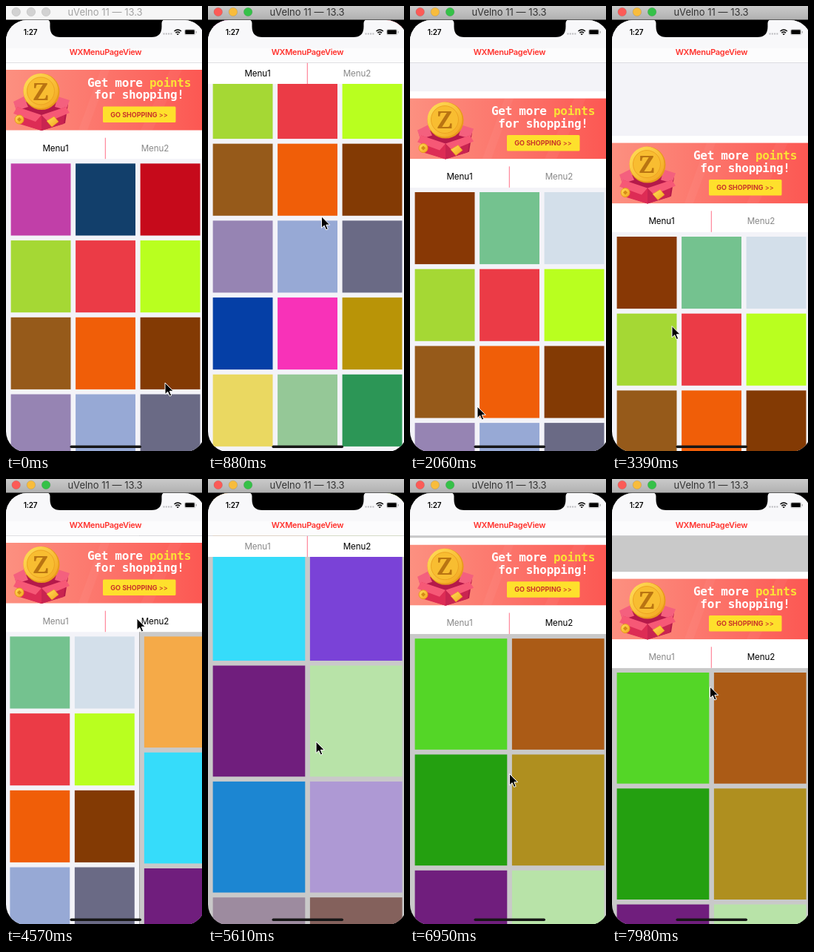
These frames come from a looping animation (265 px wide and 600 px high, 8 s). An HTML page:

```html
<!DOCTYPE html>
<html lang="en">
<head>
<meta charset="utf-8">
<title>Menu page view</title>
<style>
  html, body { margin: 0; width: 100%; height: 100%; overflow: hidden; background: #000; }
  svg { display: block; width: 265px; height: 600px; }
  text { font-family: Inter, Roboto, sans-serif; text-anchor: middle; }
  .window-title { font-size: 13px; }
  .nav-title { font-size: 11px; font-weight: 600; letter-spacing: -.3px; fill: #ff322d; }
  .clock { font-size: 10px; font-weight: 600; letter-spacing: -.2px; }
  .tab { font-size: 11.6px; letter-spacing: -.1px; }
  .slogan { font: bold 16px "DejaVu Sans Mono", monospace; letter-spacing: -.3px; fill: #fff; }
  .cta { font-size: 9px; font-weight: 700; fill: #c9342a; }
</style>
</head>
<body>
<svg viewBox="0 0 265 600">
  <defs>
    <clipPath id="screen"><rect y="19" width="269" height="582.5" rx="28"/></clipPath>
    <linearGradient id="barFill" x2="0" y2="1">
      <stop stop-color="#cacaca"/><stop offset="1" stop-color="#b0b0b0"/>
    </linearGradient>
    <linearGradient id="coral">
      <stop stop-color="#fc9080"/><stop offset=".45" stop-color="#fc776d"/><stop offset="1" stop-color="#fc5752"/>
    </linearGradient>
    <linearGradient id="gold" x2="1" y2="1">
      <stop stop-color="#ffe05a"/><stop offset="1" stop-color="#f3a41e"/>
    </linearGradient>
  </defs>

  <rect width="265" height="600"/>
  <rect id="bar" width="265" height="18.5"/>
  <g id="lights"></g>
  <text id="windowTitle" class="window-title" x="134" y="13">uVelno 11 — 13.3</text>

  <g clip-path="url(#screen)">
    <g id="pages">
      <rect y="19" width="269" height="582" fill="#f3f3f8"/>
      <rect x="269" y="19" width="269" height="582" fill="#c9c9c9"/>
      <g id="grids"></g>
    </g>

    <g id="header">
      <rect y="76.5" width="269" height="129.5" fill="#fff"/>
      <g transform="translate(0 86)">
        <rect width="269" height="81.5" fill="url(#coral)"/>
        <path d="M128 0h12l-30 81.500H98zM222 0h16l-40 81.500h-16z" fill="#fff" opacity=".04"/>
        <path d="M12 47 46 39 84 46 80 72 48 82 18 72z" fill="#b5194a"/>
        <path d="M10 43 24 36 30 50 14 55zM86 41 70 36 66 50 81 54z" fill="#f4607e"/>
        <circle cx="48" cy="29.500" r="24.500" fill="#e89a1c"/>
        <circle cx="47" cy="28.500" r="23.500" fill="url(#gold)"/>
        <circle cx="47" cy="28.500" r="18.500" fill="#f8bd31" stroke="#eda322"/>
        <text x="47" y="40.500" style="font: bold 33px 'Noto Serif', serif" fill="#b97412">Z</text>
        <path d="M15 50 48 62V82L18 73z" fill="#dd2c55"/>
        <path d="M81 50 48 62V82L78 73z" fill="#c92450"/>
        <path d="M15 50 48 61 40 70 10 59zM81 50 48 61 57 70 86 58z" fill="#f65876"/>
        <circle cx="18" cy="67" r="6" fill="url(#gold)" stroke="#e89a1c"/>
        <path d="m15 67 3-3 3 3-3 3z" fill="#d48a18"/>
        <path d="m55 69 10-6 6 7-9 7z" fill="url(#gold)" stroke="#e89a1c" stroke-width=".6"/>
        <text class="slogan" x="180" y="22.500">Get more <tspan fill="#fbe335">points</tspan></text>
        <text class="slogan" x="180" y="39">for shopping!</text>
        <rect x="131" y="49.500" width="98.500" height="21.500" rx="1.500" fill="#fee02c"/>
        <text class="cta" x="180" y="63.700">GO SHOPPING <tspan font-weight="500">&gt;&gt;</tspan></text>
      </g>
    </g>

    <g id="menu">
      <rect width="269" height="28.500" fill="#fff"/>
      <rect x="133.800" width="1" height="28.500" fill="#ff7088"/>
      <text class="tab" x="67" y="18">Menu1</text>
      <text class="tab" x="201.500" y="18">Menu2</text>
    </g>

    <rect y="19" width="269" height="38" fill="#f8f8fa"/>
    <rect y="57" width="269" height="19" fill="#fcfcfd"/>
    <rect y="76" width="269" height=".7" fill="#d4d4d8"/>
    <path d="M55 18q4.500 1 4.500 5v5q0 14 14 14h123q14 0 14-14v-5q0-4 4.500-5z"/>
    <text class="clock" x="33" y="38.500">1:27</text>
    <path d="M212.500 37.500h12" stroke="#b9b9bd" stroke-width="2" stroke-dasharray="2 1.300"/>
    <g fill="none" stroke="#000" stroke-width="1.500">
      <path d="M227.500 34q4.700-4 9.400 0M229.300 36.200q2.900-2.500 5.800 0"/>
      <path d="m231 37.700 1.200 1.300 1.200-1.300z" stroke-width=".7" fill="#000"/>
    </g>
    <rect x="241.500" y="31.500" width="14.500" height="7.500" rx="2" fill="none" stroke="#bbb" stroke-width=".7"/>
    <rect x="242.300" y="32.300" width="12.500" height="5.800" rx="1"/>
    <rect x="256.700" y="34" width="1" height="2.500" rx=".5" fill="#999"/>
    <text class="nav-title" x="134.500" y="66">WXMenuPageView</text>
    <rect x="86.500" y="592.500" width="96.500" height="3.500" rx="1.700" fill="#161616"/>
  </g>

  <path id="cursor" d="M0 0V15.500L3.700 12.200 6.200 18 8.700 17 6.300 11.300H11.200z"
        stroke="#fff" stroke-linejoin="round"/>
</svg>

<script>
const LOOP = 8000;
const STEP = 147.8;
const PAGE_WIDTH = 269;
const GAP = 6.6;
const $ = id => document.getElementById(id);

function add(parent, tag, attrs) {
  const node = document.createElementNS('http://www.w3.org/2000/svg', tag);
  for (const key in attrs) node.setAttribute(key, attrs[key]);
  return parent.appendChild(node);
}
const fill = (node, color) => node.setAttribute('fill', color);
const move = (node, x, y) => node.setAttribute('transform', `translate(${x} ${y})`);

// Every cell has an arbitrary colour: named ones as given, "?" from a seeded generator.
let seed = 7;
const random = () => (seed = seed * 16807 % 2147483647) / 2147483647;
const parseColors = list => list.trim().split(/\s+/).map(c =>
  c === '?' ? `hsl(${360 * random()} 65% 55%)` : '#' + c);

function makeGrid({ left, columns, width, height, colors, reused, reusedFrom }) {
  const base = parseColors(colors);
  const fresh = parseColors(reused);
  const cells = base.map((color, i) => add($('grids'), 'rect', {
    x: left + GAP + (i % columns) * (width + GAP),
    y: 212.4 + Math.floor(i / columns) * (height + GAP),
    width, height, fill: color
  }));
  // Cells that scrolled out of view come back in a new colour.
  return step => fresh.forEach((color, i) => fill(cells[i], step < reusedFrom ? base[i] : color));
}

const grids = [
  {
    left: 0, columns: 3, width: 80.9, height: 97.1, reusedFrom: 9,
    colors: `c13fa8 123f6b c60a1b  a5d834 eb3b46 b9ff1f  965a1a f05e08 833a04
      9684b3 97a9d5 6a6a85  053fa6 f832b8 b99407  ead861 95c897 2c9656
      a94c1c 26a44c 5f6a10  ? ? ?`,
    reused: '883805 74c28f d3dfea'
  },
  {
    left: PAGE_WIDTH, columns: 2, width: 124.7, height: 149.7, reusedFrom: 42,
    colors: `f5aa48 ?  36dcfa ?  701e7d b8e3a8  1c86d2 ae99d4
      9d8b9f 84615c  b661e6 97216b  a43e08 45d32f  ? ?`,
    reused: '54d627 ab5b16 24a010 af8f1f'
  }
].map(makeGrid);

const lights = ['#fc5b57', '#f8bc3c', '#35c148'].map((color, i) => ({
  color, node: add($('lights'), 'circle', { cx: 13.7 + 20.2 * i, cy: 8, r: 5.8, stroke: '#0003', 'stroke-width': .5 })
}));
const tabs = document.querySelectorAll('.tab');

// Drags and releases: the scroll offset and pointer reached at each step
const gestures = [
  { step: 1, offset: 0, x: 215, y: 508 },
  { step: 9, offset: -342.5, x: 125, y: 180 },
  { step: 14, offset: 38.6, x: 91, y: 540 },
  { step: 18, offset: 0, x: 82, y: 240 },
  { step: 23, offset: 98.6, x: 81, y: 431.5 },
  { step: 28, offset: 0, x: 177, y: 188 },
  { step: 32, offset: 0, x: 177, y: 188 },
  { step: 35, offset: 0, x: 150, y: 480 },
  { step: 42, offset: -694.7, x: 140, y: 160 },
  { step: 46, offset: 28, x: 135, y: 470 },
  { step: 49, offset: 0, x: 133, y: 190 },
  { step: 54, offset: 48.6, x: 132.5, y: 280 }
];
const smooth = k => k * k * (3 - 2 * k);
const springBack = k => 1 - (1 - k) ** 5.7;
const mix = (a, b, k) => a + (b - a) * k;

function poseAt(step) {
  const next = gestures.findIndex(g => g.step >= step);
  if (next === 0) return gestures[0];
  const a = gestures[next - 1], b = gestures[next];
  const k = (step - a.step) / (b.step - a.step);
  const ease = b.offset === 0 ? springBack : smooth;
  return {
    offset: mix(a.offset, b.offset, ease(k)),
    x: mix(a.x, b.x, smooth(k)),
    y: mix(a.y, b.y, smooth(k))
  };
}

function render(step) {
  const { offset, x, y } = poseAt(step);
  const active = step >= 1;
  const slide = Math.max(0, Math.min(1, (step - 30) / 2));
  const onSecond = slide > 0;

  fill($('bar'), active ? 'url(#barFill)' : '#f6f6f6');
  fill($('windowTitle'), active ? '#333' : '#a3a3a3');
  lights.forEach(({ node, color }) => fill(node, active ? color : '#d2d2d2'));

  move($('pages'), -PAGE_WIDTH * slide ** 1.6, 0);
  move($('grids'), 0, offset);
  move($('header'), 0, offset);
  move($('menu'), 0, Math.max(76.5, 177.7 + offset));
  fill(tabs[0], onSecond ? '#888' : '#000');
  fill(tabs[1], onSecond ? '#000' : '#888');
  grids.forEach(recolor => recolor(step));
  move($('cursor'), x, y);
}

const start = performance.now();
let shown = -1;
function tick() {
  const time = (performance.now() - start) % LOOP;
  const step = Math.min(54, Math.floor((time + 13) / STEP));
  if (step !== shown) render(shown = step);
  requestAnimationFrame(tick);
}
tick();
</script>
</body>
</html>
```
